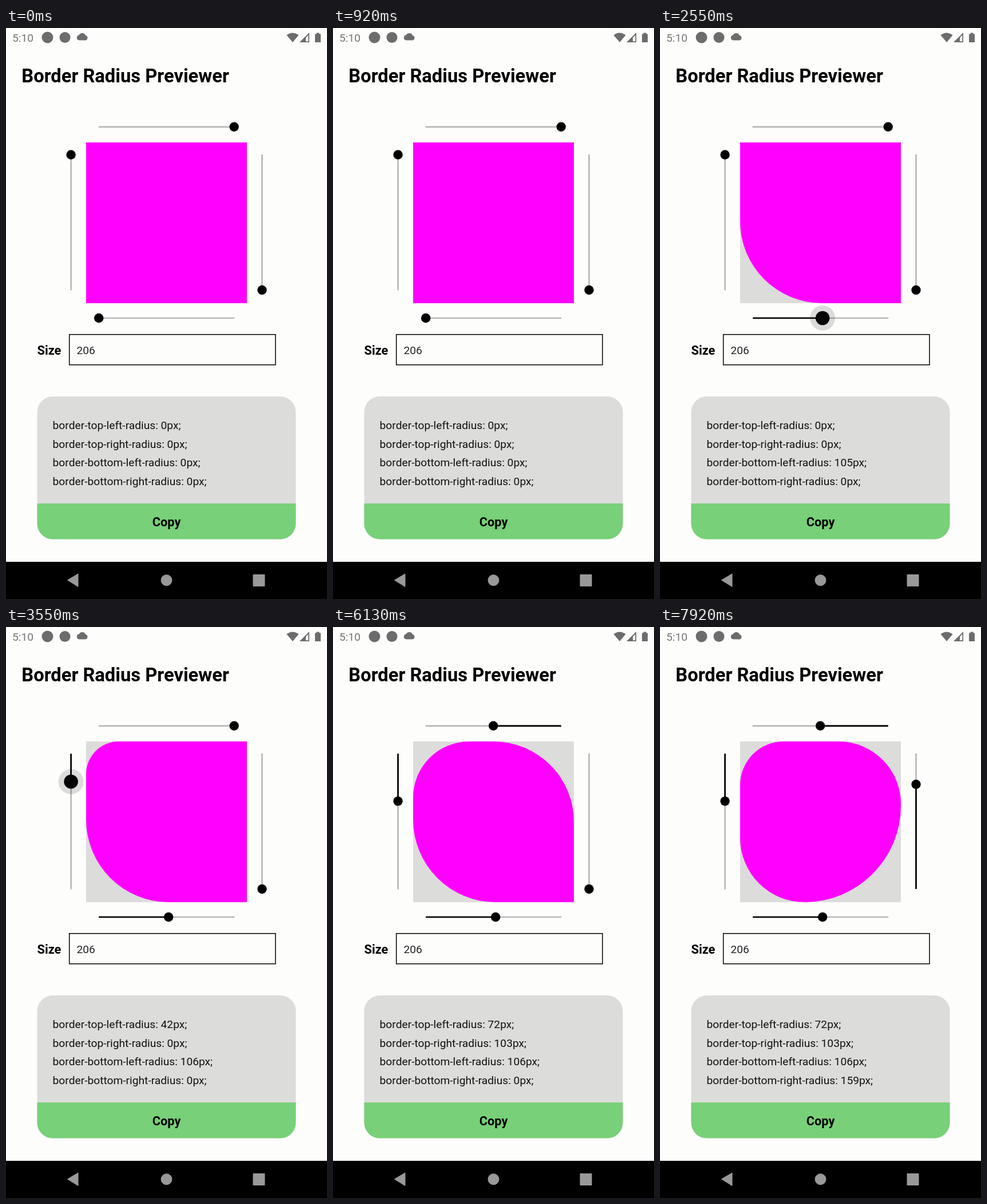
Animation, 561 px wide and 998 px high, one loop 8000 ms. Source, as an HTML page:

```html
<!DOCTYPE html>
<html lang="en">
<head>
<meta charset="utf-8">
<title>Border Radius Previewer</title>
<style>
  html, body { margin: 0; width: 100%; height: 100%; overflow: hidden; background: #fdfdfc; }
  svg { position: absolute; left: 0; top: 0; }
  text { font-family: Roboto, sans-serif; font-size: 19.2px; fill: #111; white-space: pre; }
  .bold { font-weight: 700; font-size: 21.8px; fill: #000; }
  #frame { position: absolute; left: 140px; top: 199.5px; width: 281px; height: 281px; background: #dcdcda; }
  #shape { width: 100%; height: 100%; background: #f0f; }
</style>
</head>
<body>
<div id="frame"><div id="shape"></div></div>
<svg width="561" height="998" viewBox="0 0 561 998">
  <!-- status bar -->
  <g fill="#6c6c6c">
    <text x="11" y="24" style="fill:#757575">5:10</text>
    <circle cx="72.5" cy="16.5" r="10"/>
    <circle cx="103" cy="16.5" r="9.5"/>
    <path d="M128 21.500a4.500 4.500 0 0 1-.5-8.900a6.200 6.200 0 0 1 11.500.4a4.300 4.300 0 0 1-.5 8.500z"/>
    <path d="M490.500 12.500Q501 4.500 511.500 12.500L501 25z"/>
    <path d="M513 25L530 8V25z"/>
    <path d="M524 17L528.300 12.500V23.300H524z" fill="#fdfdfc"/>
    <path d="M540 10.500h2.500v-2h5v2h2.500V25h-10z"/>
  </g>

  <text class="bold" x="27.300" y="95" style="font-size:32.7px">Border Radius Previewer</text>
  <g id="sliders"></g>

  <text class="bold" x="54.500" y="571">Size</text>
  <rect x="110.700" y="535.700" width="360.300" height="53" fill="none" stroke="#000" stroke-width="1.500"/>
  <text x="123.500" y="570" style="fill:#222">206</text>

  <rect x="54.500" y="644" width="452" height="249.500" rx="27" fill="#dcdcda"/>
  <path d="M54.500 831h452v35.500a27 27 0 0 1-27 27h-398a27 27 0 0 1-27-27z" fill="#78d078"/>
  <g id="rules"></g>
  <text class="bold" x="280.500" y="871" text-anchor="middle">Copy</text>

  <!-- navigation bar -->
  <rect y="933" width="561" height="65" fill="#000"/>
  <g fill="#999" stroke="#999" stroke-linejoin="round">
    <path d="M107.500 965L126 954V976.500z"/>
    <circle cx="280.500" cy="965.200" r="9.500"/>
    <rect x="432" y="955.500" width="20" height="20"/>
  </g>
</svg>
<script>
const SIZE = 206, TRACK = 237, LOOP = 8000;
const NS = 'http://www.w3.org/2000/svg';

// Times in ms; lag delays the value behind the knob.
const corners = [
  { name: 'top-left', place: 'translate(113.6 221.5) rotate(90)', end: 72,
    press: 3210, from: 3300, to: 4000, release: 4230, power: 2, lag: 0 },
  { name: 'top-right', place: 'translate(398.7 172.8) rotate(180)', end: 103,
    press: 4800, from: 5000, to: 5750, release: 5960, power: 1.5, lag: 20 },
  { name: 'bottom-left', place: 'translate(162.2 507)', end: 106,
    press: 1450, from: 1750, to: 2550, release: 2730, power: 1.25, lag: 20 },
  { name: 'bottom-right', place: 'translate(447.5 458) rotate(-90)', end: 159,
    press: 6500, from: 6600, to: 7700, release: 7780, power: 1.5, lag: 20 },
];

const clamp = x => Math.max(0, Math.min(1, x));
const shape = document.getElementById('shape');

function add(parent, tag, attrs) {
  const node = document.createElementNS(NS, tag);
  for (const key in attrs) node.setAttribute(key, attrs[key]);
  return parent.appendChild(node);
}

corners.forEach((c, i) => {
  const g = add(document.getElementById('sliders'), 'g', { transform: c.place });
  add(g, 'path', { d: `M0 0H${TRACK}`, stroke: '#b8b8b8', 'stroke-width': 2.7 });
  c.bar = add(g, 'path', { stroke: '#000', 'stroke-width': 2.7 });
  c.halo = add(g, 'circle', { fill: '#000' });
  c.knob = add(g, 'circle', { fill: '#000' });
  c.text = add(document.getElementById('rules'), 'text', { x: 81.6, y: 700.7 + 32.8 * i });
});

function valueAt(c, t) {
  const p = clamp((t - c.from) / (c.to - c.from));
  return c.end * (1 - (1 - p) ** c.power);
}

function draw(t) {
  const radii = {};
  for (const c of corners) {
    const x = valueAt(c, t) / SIZE * TRACK;
    const value = Math.round(valueAt(c, t - c.lag));
    const down = clamp((t - c.press) / 150);
    const up = clamp((t - c.release) / 120);
    c.bar.setAttribute('d', `M0 0H${x}`);
    c.knob.setAttribute('cx', x);
    c.knob.setAttribute('r', 8.2 + 4.1 * down * (1 - up));
    c.halo.setAttribute('cx', x);
    c.halo.setAttribute('r', 22 * down);
    c.halo.setAttribute('opacity', 0.135 * (1 - up));
    c.text.textContent = `border-${c.name}-radius: ${value}px;`;
    radii[c.name] = value * 281 / SIZE + 'px';
  }
  shape.style.borderRadius = ['top-left', 'top-right', 'bottom-right', 'bottom-left']
    .map(name => radii[name]).join(' ');
}

function tick() {
  draw(performance.now() % LOOP);
  requestAnimationFrame(tick);
}
tick();
</script>
</body>
</html>
```
